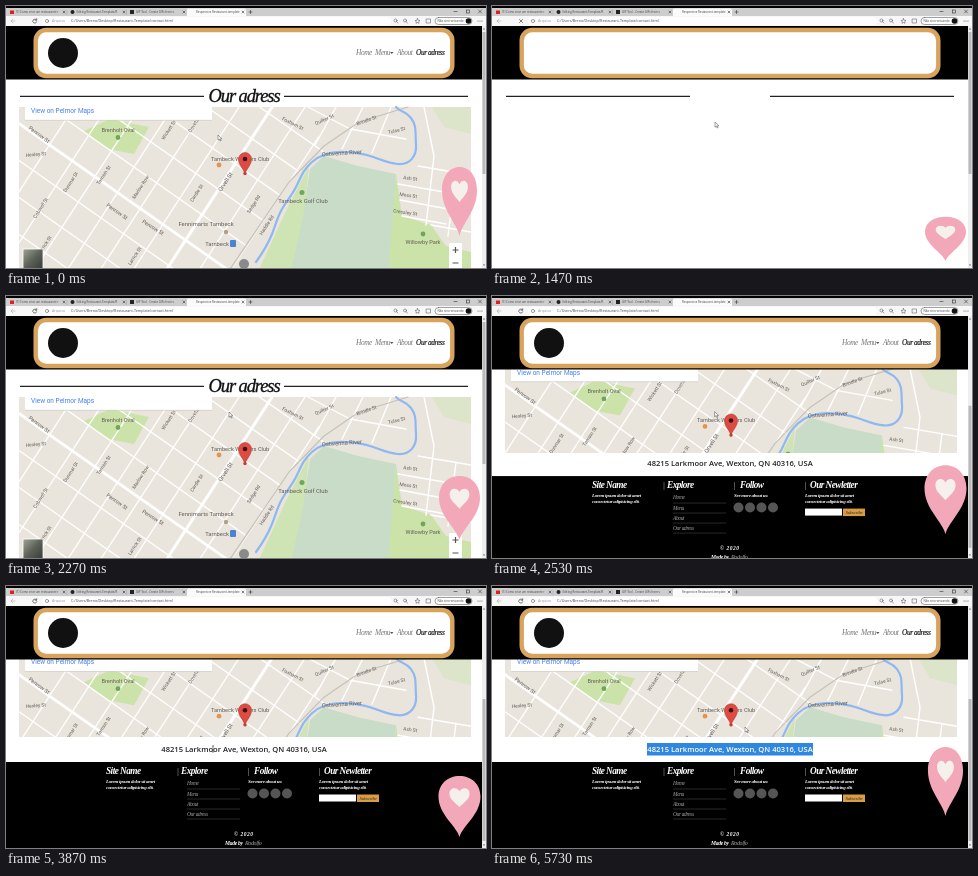
Recreate the animation shown at these times as an HTML page. Size 480x262 px, loop 5.79 s.

```html
<!DOCTYPE html>
<html lang="en">
<head>
<meta charset="utf-8">
<title>Contact page</title>
<style>
html, body { margin: 0; width: 100%; height: 100%; overflow: hidden; background: #fff; }
svg { display: block; width: 100vw; height: 100vh; }
text { font-family: Roboto, "Open Sans", sans-serif; white-space: pre; }
.script text, text.script { font-family: "Liberation Serif", "Noto Serif", serif; font-style: italic; letter-spacing: -.06em; }
.bold { font-weight: 700; }
.mid { text-anchor: middle; }
.ui text { font: 3.7px "Open Sans", sans-serif; fill: #444; }
.ui .tabs text { font-size: 2.9px; }
.addr text { font: 600 7.6px "Open Sans", sans-serif; text-anchor: middle; }
.line { fill: none; stroke-linecap: round; stroke-linejoin: round; }
#labels text { fill: #605c57; text-anchor: middle; }
</style>
</head>
<body>
<svg viewBox="0 0 480 262" preserveAspectRatio="none">
  <defs>
    <clipPath id="mapClip"><rect id="mapBox" x="13" y="73" width="452" height="200"/></clipPath>
    <clipPath id="town"><path d="M13 101H302L318 145L283 176L222 270H13Z"/></clipPath>
    <clipPath id="selClip"><rect id="selBox" x="155" y="157" width="0" height="13"/></clipPath>
    <linearGradient id="aerial" x2="1" y2="1">
      <stop stop-color="#a3a398"/><stop offset=".5" stop-color="#5b6157"/><stop offset="1" stop-color="#343a35"/>
    </linearGradient>
  </defs>
  <rect width="480" height="262" fill="#fff"/>

  <path id="rules" d="M14 90.3H198M278 90.3H462" stroke="#222" stroke-width="1.3"/>
  <g id="content">
    <text id="title" class="script mid" x="238" y="96" font-size="18.5" fill="#111" stroke="#111" stroke-width=".3">Our adress</text>
    <g clip-path="url(#mapClip)">
      <g id="map">
        <rect x="13" y="101" width="452" height="220" fill="#e9e5dc"/>
        <path d="M78 125L104 113L143 121L128 148L102 143Z" fill="#cbe3a8"/>
        <path d="M303 160L280 205L250 270H300V190Z" fill="#cfe4b4"/>
        <path d="M304 163L318 150L352 160L390 168L384 270H284L297 212Z" fill="#c8dcc8"/>
        <path d="M390 168L396 210L425 219L440 240L465 246V270H382Z" fill="#cbe3a8"/>
        <path d="M426 101H465V128L438 121Z" fill="#dce5c9"/>
        <g id="roads" clip-path="url(#town)" stroke="#fff"></g>
        <g class="line" stroke="#fff" stroke-width="1.4">
          <path d="M302 101L344 123L400 133M330 101L309 139M357 101L336 143M385 101L366 147M392 178L444 187M394 194L442 203M396 210L440 218M418 101L428 150L420 219M412 160L465 169M450 166L442 230M425 219L465 226"/>
        </g>
        <path class="line" d="M222 266L283 176L318 140L353 116L402 101" stroke="#c6c2bb" stroke-width="1.2"/>
        <path class="line" d="M250 256C258 245 262 238 266 228S271 212 276 203S285 191 290 181S297 164 306 156S328 145 340 146S354 147 364 150S380 157 392 158S411 150 410 138S411 120 405 112S395 107 390 101" stroke="#8fb8f2" stroke-width="2.2"/>
        <g id="labels"></g>
        <g fill="#6fa65b"><circle cx="112" cy="131.500" r="2.400"/><circle cx="296" cy="186.500" r="2.500"/><circle cx="417" cy="228" r="2.400"/></g>
        <circle cx="213" cy="159" r="2.400" fill="#e5944d"/>
        <circle cx="220" cy="226" r="2.200" fill="#b0a08c"/>
        <rect x="224" y="234" width="6" height="7" rx="1" fill="#4a83d4"/>
        <circle cx="238" cy="258" r="5" fill="#8a8a8a"/>
        <rect x="17" y="243" width="20" height="21" fill="url(#aerial)" stroke="#fff" stroke-width=".8"/>
        <rect x="443" y="237" width="13" height="28" rx="1" fill="#fff"/>
        <path d="M446.500 244H452.500M449.500 241V247M446.500 257H452.500" stroke="#555" stroke-width="1.2"/>
        <path d="M19 100H206V114H19Z" fill="#fff"/>
        <path d="M19 114.300H206" stroke="#c9c6bf" stroke-width=".6"/>
        <text x="25" y="107.300" font-size="6.5" fill="#427fed">View on Pelmor Maps</text>
        <path d="M239 169C238.500 163 232.500 160 232.500 153A6.500 6.500 0 0 1 245.500 153C245.500 160 239.500 163 239 169Z" fill="#dd4b43" stroke="#a93430" stroke-width=".5"/>
        <circle cx="239" cy="153" r="2.300" fill="#3c1415"/>
        <circle cx="239" cy="167.500" r="1.700" fill="#c93c36"/>
      </g>
    </g>
  </g>

  <g id="foot">
    <g class="addr">
      <text x="238" y="166.300" fill="#222">48215 Larkmoor Ave, Wexton, QN 40316, USA</text>
      <g clip-path="url(#selClip)">
        <rect x="155" y="157" width="166" height="12.500" fill="#2f87e0"/>
        <text x="238" y="166.300" fill="#fff">48215 Larkmoor Ave, Wexton, QN 40316, USA</text>
      </g>
    </g>
    <rect y="176" width="476" height="90" fill="#000"/>
    <g class="script bold" fill="#fff" font-size="9.300">
      <text x="100" y="188">Site Name</text>
      <text x="175" y="188">Explore</text>
      <text x="248" y="188">Follow</text>
      <text x="318" y="188">Our Newletter</text>
      <g font-size="5">
        <text x="100" y="197">Lorem ipsum dolor sit amet</text>
        <text x="100" y="203">consectetur adipisicing elit.</text>
        <text x="242" y="197">See more about us:</text>
        <text x="313" y="197">Lorem ipsum dolor sit amet</text>
        <text x="313" y="203">consectetur adipisicing elit.</text>
      </g>
      <text x="228" y="250" font-size="5.500" style="letter-spacing:.5px">© 2020</text>
      <text x="219" y="259" font-size="5.700">Made by</text>
    </g>
    <g class="script" fill="#a5a5a5" font-size="5.400">
      <text x="181" y="199">Home</text><text x="181" y="209.500">Menu</text>
      <text x="181" y="219.500">About</text><text x="181" y="229.500">Our adress</text>
      <text x="239" y="259" font-size="6">Rodolfo</text>
    </g>
    <path d="M172 182V190M242.500 182V190M313.500 182V190" stroke="#888" stroke-width=".6"/>
    <path d="M181 203H234M181 213H234M181 223H234M181 233H234" stroke="#444" stroke-width=".6"/>
    <g fill="#555"><circle cx="246.500" cy="207.500" r="5"/><circle cx="258" cy="207.500" r="5"/><circle cx="269.500" cy="207.500" r="5"/><circle cx="281" cy="207.500" r="5"/></g>
    <rect x="313" y="208.500" width="37" height="7" fill="#fff"/>
    <rect x="351" y="208.500" width="22" height="7.500" fill="#d99b45"/>
    <text class="script mid" x="362" y="213.800" font-size="5" fill="#332">Subscribe</text>
  </g>

  <rect y="20" width="476" height="53.500" fill="#000"/>
  <rect x="29.700" y="24" width="416.600" height="46" rx="10.500" fill="#fff" stroke="#d7a35d" stroke-width="4.400"/>
  <g id="nav">
    <circle cx="57" cy="47" r="15" fill="#111"/>
    <g class="script" fill="#777" font-size="7.400">
      <text x="350" y="49.300">Home</text><text x="369" y="49.300">Menu</text><text x="391" y="49.300">About</text>
      <text x="410" y="49.300" fill="#222" stroke="#222" stroke-width=".2">Our adress</text>
    </g>
    <path d="M384 46H387.500L385.750 48Z" fill="#555"/>
  </g>

  <g class="ui">
    <rect width="480" height="11" fill="#cdcdcd"/>
    <rect width="480" height="2" fill="#000"/>
    <path d="M181 11V4Q181 2.500 182.500 2.500H238.500Q240 2.500 240 4V11Z" fill="#fafafa"/>
    <rect y="10" width="480" height="10" fill="#f7f7f7"/>
    <rect x="36" y="11" width="349" height="8" rx="4" fill="#fff"/>
    <path d="M61 4V9M120.500 4V9" stroke="#aaa" stroke-width=".6"/>
    <rect x="4" y="4.500" width="4" height="3.500" fill="#e02020"/>
    <circle cx="66.500" cy="6" r="2" fill="#222"/>
    <rect x="124" y="4" width="4" height="4" fill="#222"/>
    <g class="tabs">
      <text x="10" y="7.200">(1) Como criar um restaurante r</text>
      <text x="70.500" y="7.200">Editing Restaurant-Template/R</text>
      <text x="130" y="7.200">GIF Tool - Create GIFs from v</text>
      <text x="190" y="7.200">Responsive Restaurant-template</text>
    </g>
    <text x="46" y="16.300" style="fill:#999">Arquivo</text>
    <text x="65" y="16.300">C:/Users/Breno/Desktop/Restaurant-Template/contact.html</text>
    <path class="line" d="M57 5L59 7M59 5L57 7M117 5L119 7M119 5L117 7M177 5L179 7M179 5L177 7M236 5L238 7M238 5L236 7M243 6H246M244.500 4.500V7.500M448 5.500H451M472.500 4L475.500 7M475.500 4L472.500 7" stroke="#333" stroke-width=".6"/>
    <rect x="460.500" y="4" width="3" height="3" fill="none" stroke="#333" stroke-width=".6"/>
    <path class="line" d="M9 15H5M7 13L5 15L7 17" stroke="#aaa" stroke-width=".6"/>
    <path class="line" id="reload" stroke="#444" stroke-width=".7"/>
    <g class="line" stroke="#666" stroke-width=".6">
      <circle cx="41" cy="15" r="1.600"/><circle cx="389.500" cy="14.500" r="1.500"/><circle cx="399" cy="14.500" r="1.500"/>
      <path d="M390.500 15.700L392 17M400 15.700L401.500 17M411.500 12.500L412.300 14.300L414 14.500L412.700 15.700L413 17.300L411.500 16.500L410 17.300L410.300 15.700L409 14.500L410.700 14.300Z"/>
      <rect x="420.500" y="13" width="4" height="4"/>
      <rect x="429" y="11.500" width="37" height="7" rx="3.500" fill="#fff"/>
    </g>
    <text x="431.500" y="16.200" style="font-size:3px">Não sincronizando</text>
    <circle cx="462.500" cy="15" r="2.800" fill="#111"/>
    <g fill="#444"><circle cx="472" cy="15" r=".5"/><circle cx="474" cy="15" r=".5"/><circle cx="476" cy="15" r=".5"/></g>
    <rect x="476" y="20" width="4" height="242" fill="#eee"/>
    <path d="M477 23.500L478 22L479 23.500ZM477 258.500L478 260L479 258.500Z" fill="#555"/>
    <rect id="thumb" x="476.500" y="26" width="3" height="142" fill="#b9b9b9"/>
  </g>

  <g id="pin">
    <path d="M.5 1C.43 .82 0 .63 0 .34C0 .13 .22 0 .5 0S1 .13 1 .34C1 .63 .57 .82 .5 1Z" fill="#f3a8ba"/>
    <path d="M.5 .51C.43 .45 .26 .39 .26 .29C.26 .19 .43 .17 .5 .25C.57 .17 .74 .19 .74 .29C.74 .39 .57 .45 .5 .51Z" fill="#f5f0eb"/>
  </g>
  <g id="cursor">
    <path id="arrow" d="M0 0V5.200L1.300 4.100L2.200 6L3.100 5.600L2.200 3.800H3.900Z" fill="#fff" stroke="#444" stroke-width=".5"/>
    <path id="beam" d="M-1-3H1M0-3V3M-1 3H1" stroke="#333" stroke-width=".6"/>
  </g>
</svg>
<script>
const $ = id => document.getElementById(id);
const LOOP = 5790, STEP = 200 / 3, BOUNCE = 1146;
const clamp = (v, a = 0, b = 1) => Math.min(b, Math.max(a, v));
const show = (id, on) => { $(id).style.display = on ? "" : "none"; };
const move = (id, x, y) => $(id).setAttribute("transform", `translate(${x} ${y})`);

function add(parent, tag, attrs, text = "") {
  const el = document.createElementNS("http://www.w3.org/2000/svg", tag);
  for (const key in attrs) el.setAttribute(key, attrs[key]);
  el.textContent = text;
  parent.append(el);
}

// Values of a table of [time, ...values] at time t
function sample(rows, t) {
  if (t <= rows[0][0]) return rows[0].slice(1);
  for (let i = 1; i < rows.length; i++) {
    const a = rows[i - 1], b = rows[i];
    if (t <= b[0]) {
      const p = (t - a[0]) / (b[0] - a[0]);
      return a.slice(1).map((v, k) => v + (b[k + 1] - v) * p);
    }
  }
  return rows[rows.length - 1].slice(1);
}

// Town grid: two families of nearly perpendicular streets
function street(x, y, angle, width) {
  add($("roads"), "path", {
    d: "M-400 0H400", "stroke-width": width,
    transform: `translate(${x} ${y}) rotate(${angle})`
  });
}
for (let i = 0; i < 11; i++) street(205, 30 + i * 37, 35, i === 6 ? 2.8 : 1.3);
for (let i = 0; i < 13; i++) street(20 + i * 33, 175, -57, i === 6 ? 3 : 1.3);

const labels = [
  ["Brenholt Oval", 112, 126, 0, 5.6], ["Tarnbeck Weavers Club", 234, 155, 0, 5.6],
  ["Tarnbeck Golf Club", 297, 196.5, 0, 5.9], ["Fennimarts Tarnbeck", 200, 220, 0, 5.9],
  ["Tarnbeck", 211, 239.5, 0, 5.8], ["Willowby Park", 417, 238, 0, 5.6],
  ["Ostwenna River", 336, 149, -4, 5.8], ["Hexley St", 30, 150, -5],
  ["Penrow St", 32, 130, 36, 5.4], ["Penrow St", 110, 207, 35, 5.4], ["Penrow St", 146, 223, 32, 5.4],
  ["Orvell St", 221, 177, -57, 5.8], ["Dunmar St", 66, 177, -57], ["Cobwell St", 36, 203, -57],
  ["Larrick St", 40, 240, -57], ["Tamsin St", 99, 170, -57], ["Marlow Row", 136, 182, -57],
  ["Dovetail St", 191, 117, -57], ["Wickett St", 164, 125, -57], ["Cardle St", 192, 188, -57],
  ["Foxham St", 286, 119, 27], ["Quilter St", 319, 115, -24], ["Brindle St", 361, 116, -20],
  ["Tulse St", 391, 126, -14], ["Sedge Rd", 249, 199, -57], ["Haddle Rd", 262, 220, -57],
  ["Ash St", 404, 174, 8], ["Moss St", 402, 191, 8], ["Cressley St", 399, 208, 8],
  ["Larrick St", 130, 251, -57]
];
for (const [name, x, y, turn, size = 4.9] of labels) {
  add($("labels"), "text", { transform: `translate(${x} ${y}) rotate(${turn})`, "font-size": size }, name);
}

// time, top, width, height
const hops = [
  [0, 161, 35, 69], [130, 162, 38, 69], [241, 169, 42, 69], [283, 190, 42, 61],
  [321, 211, 41, 44], [429, 190, 42, 61], [560, 180, 41, 64], [1121, 180, 41, 64], [1146, 161, 35, 69]
];
// time, x, y
const mouse = [
  [0, 212, 129], [1270, 223, 116], [2270, 223, 116], [3000, 222, 115], [3867, 207, 163],
  [4270, 153, 163], [4800, 345, 157], [4867, 345, 157], [5733, 253, 141]
];

function draw(t) {
  const loading = t >= 1330 && t < 1930;
  show("content", !loading);
  show("nav", !loading);
  $("reload").setAttribute("d", loading
    ? "M27.500 13.500L30.500 16.500M30.500 13.500L27.500 16.500"
    : "M30.500 14A2 2 0 1 0 30.700 15.800M30.700 12.700V14.200H29.200");

  // The map scrolls slower than the footer that covers it
  const left = (1 - clamp((t - 2400) / 200)) ** 3;
  const shift = -28.8 * clamp((1 - left) * 1.03);
  for (const id of ["map", "title", "rules"]) move(id, 0, shift);
  $("mapBox").setAttribute("height", 78 + 160 * left);
  move("foot", 0, 110 * left);
  show("foot", t >= 2400);
  $("thumb").setAttribute("y", 26 + 87 * (1 - left));

  const [top, w, h] = sample(hops, t % BOUNCE);
  $("pin").setAttribute("transform", `translate(${453.5 - w / 2} ${top}) scale(${w} ${h})`);

  const [x, y] = sample(mouse, t);
  const onText = t > 3000 && x > 155 && x < 321 && y > 157;
  move("cursor", x, y);
  show("arrow", !onText);
  show("beam", onText);
  $("selBox").setAttribute("width", t < 4270 ? 0 : t > 4800 ? 166 : clamp(x - 155, 0, 166));
}

const start = performance.now();
function tick() {
  const t = (performance.now() - start) % LOOP;
  draw(Math.floor((t + 4) / STEP) * STEP);
  requestAnimationFrame(tick);
}
tick();
</script>
</body>
</html>
```
